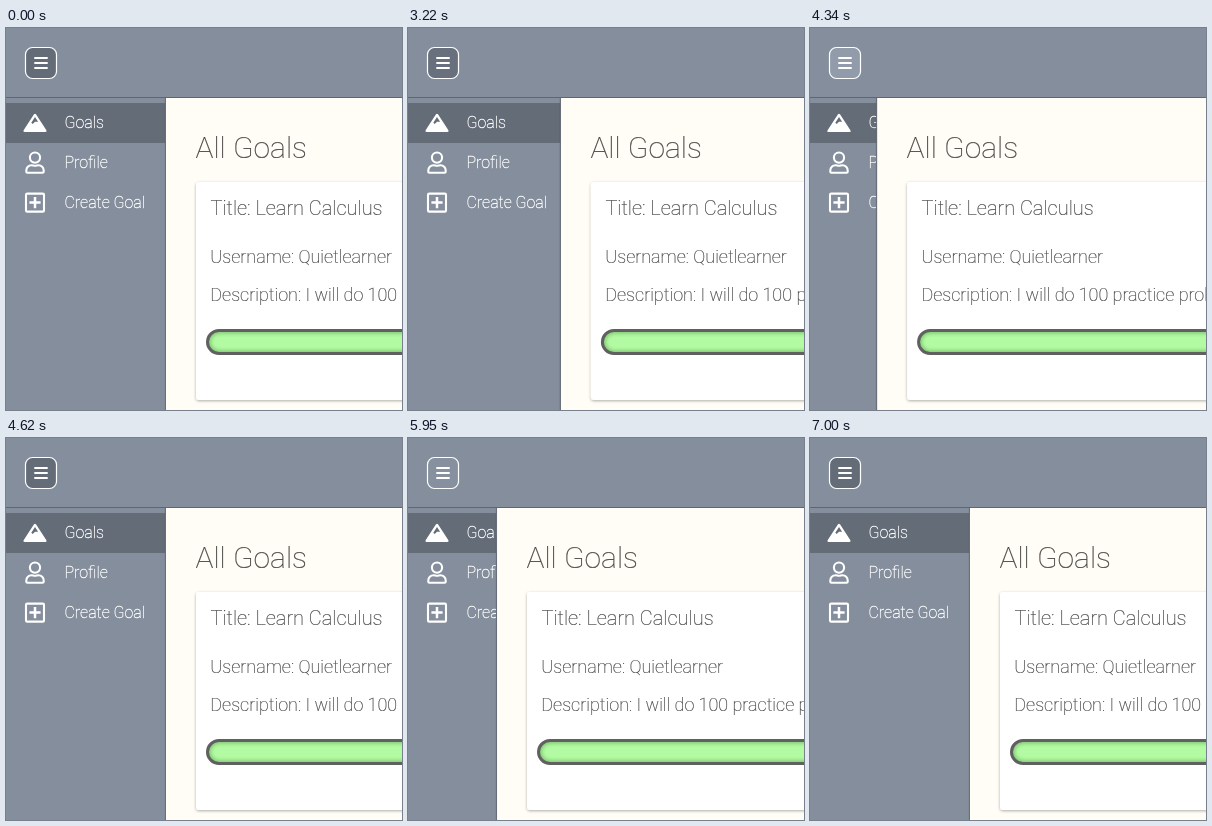
These frames come from a looping animation (396x382 px, 8 s). An HTML page:

```html
<!DOCTYPE html>
<html lang="en">
<head>
<meta charset="utf-8">
<title>Goals</title>
<style>
  html, body { margin: 0; width: 100%; height: 100%; overflow: hidden; background: #848e9c; }
  svg { display: block; width: 396px; height: 382px; }
  text { font-family: Roboto, "Open Sans", sans-serif; font-weight: 100; fill: #444; stroke: #444; stroke-width: .2; }
  .menu text { font-size: 16px; fill: #fff; stroke: #fff; stroke-width: .3; }
  .copy text { font-size: 18px; }
  .line { fill: none; stroke: #fff; stroke-width: 2.1; }
  .plus { stroke-width: 2.5; }
</style>
</head>
<body>
<svg viewBox="0 0 396 382" xmlns="http://www.w3.org/2000/svg">
  <defs>
    <filter id="edge" x="-10%" y="-10%" width="120%" height="120%">
      <feDropShadow dx="0" dy="0" stdDeviation="1.2" flood-color="#000" flood-opacity=".4"/>
    </filter>
    <filter id="lift" x="-5%" y="-5%" width="110%" height="110%">
      <feDropShadow dx="0" dy="1" stdDeviation="1.4" flood-color="#000" flood-opacity=".32"/>
    </filter>
    <filter id="soft" x="-5%" y="-40%" width="110%" height="180%">
      <feGaussianBlur stdDeviation="2"/>
    </filter>
    <clipPath id="tube"><rect x="201" y="302" width="600" height="24" rx="12"/></clipPath>
  </defs>

  <rect width="396" height="382" fill="#848e9c"/>

  <!-- sidebar -->
  <rect y="75" width="160" height="40" fill="#646c78"/>
  <path fill="#fff" fill-rule="evenodd" d="M28 86.3Q29 85 30 86.3L40.4 102.3Q41.2 104.1 39.4 104.1H18.6Q16.8 104.1 17.6 102.3Z
    M29 89.1L32.1 93.8H29L26.7 96.1L25.3 94.8Z"/>
  <g class="line">
    <circle cx="29" cy="129.6" r="5.1"/>
    <path d="M20.3 143.7V142.4A5.2 5.2 0 0 1 25.5 137.2C27 137.2 27.5 137.8 29 137.8S31 137.2 32.5 137.2A5.2 5.2 0 0 1 37.7 142.4V143.7Q37.7 144.8 36.6 144.8H21.4Q20.3 144.8 20.3 143.7Z"/>
    <rect x="20" y="165.6" width="18" height="18" rx="1.2"/>
    <path class="plus" d="M23.4 174.6H34.6M29 169V180.2"/>
  </g>
  <g class="menu">
    <text x="58.5" y="100">Goals</text>
    <text x="58.5" y="140">Profile</text>
    <text x="58.5" y="180">Create Goal</text>
  </g>

  <!-- page, slides with the sidebar edge -->
  <g id="page">
    <rect x="160" y="70" width="640" height="400" fill="#fffdf5" filter="url(#edge)"/>
    <rect x="159" y="70" width="1" height="312" fill="#686f7a"/>
    <text x="189.5" y="130" font-size="30">All Goals</text>
    <rect x="190" y="154" width="620" height="218" rx="3" fill="#fff" filter="url(#lift)"/>
    <text x="204.5" y="187" font-size="20">Title: Learn Calculus</text>
    <g class="copy">
      <text x="204.3" y="235">Username: Quietlearner</text>
      <text x="204.3" y="273">Description: I will do 100 practice problems</text>
    </g>
    <g clip-path="url(#tube)">
      <rect x="201" y="302" width="600" height="24" fill="#b2fba2"/>
      <rect x="202" y="303" width="598" height="22" rx="11" fill="none" stroke="#74b868" stroke-width="4" filter="url(#soft)"/>
    </g>
    <rect x="201.5" y="302.5" width="599" height="23" rx="11.5" fill="none" stroke="#606060" stroke-width="3"/>
  </g>

  <!-- header -->
  <rect width="396" height="70" fill="#848e9c"/>
  <rect y="69" width="396" height="1" fill="#5f6671"/>
  <rect id="button" x="19.5" y="19.5" width="31" height="31" rx="7" stroke="#fff" stroke-width="1.2"/>
  <path d="M28.3 30H41.7M28.3 35H41.7M28.3 40H41.7" class="line"/>
</svg>
<script>
  const LOOP = 8000, STEP = 70, DURATION = 300;
  const OPEN_WIDTH = 160, CLOSED_WIDTH = 60;
  const BUTTON_CLOSED = [148, 159, 174], BUTTON_OPEN = [100, 108, 120];
  // first visible step, time already elapsed by then, sidebar state reached
  const toggles = [
    { at: 3220, lead: 56, open: 0 },
    { at: 4340, lead: 56, open: 1 },
    { at: 5810, lead: 48, open: 0 },
    { at: 6720, lead: 56, open: 1 }
  ];
  const page = document.getElementById("page");
  const button = document.getElementById("button");

  // cubic-bezier(.42, 0, .58, 1), solved by bisection
  function easeInOut(x) {
    if (x >= 1) return 1;
    let low = 0, high = 1;
    for (let i = 0; i < 24; i++) {
      const s = (low + high) / 2, r = 1 - s;
      if (1.26 * s * r * r + 1.74 * s * s * r + s * s * s < x) low = s;
      else high = s;
    }
    return low * low * (3 - 2 * low);
  }

  function openness(time) {
    const last = toggles.filter(t => t.at <= time).pop();
    if (!last) return 1;
    const elapsed = last.lead + Math.floor((time - last.at) / STEP) * STEP;
    const eased = easeInOut(elapsed / DURATION);
    return last.open ? eased : 1 - eased;
  }

  const mix = (from, to, k) => from + (to - from) * k;

  function draw(time) {
    const open = openness(time);
    const shift = mix(CLOSED_WIDTH, OPEN_WIDTH, open) - OPEN_WIDTH;
    page.setAttribute("transform", `translate(${shift.toFixed(2)} 0)`);
    const fill = BUTTON_CLOSED.map((c, i) => Math.round(mix(c, BUTTON_OPEN[i], open)));
    button.setAttribute("fill", `rgb(${fill})`);
  }

  const start = performance.now();
  function tick() {
    draw((performance.now() - start) % LOOP);
    requestAnimationFrame(tick);
  }
  tick();
</script>
</body>
</html>
```
